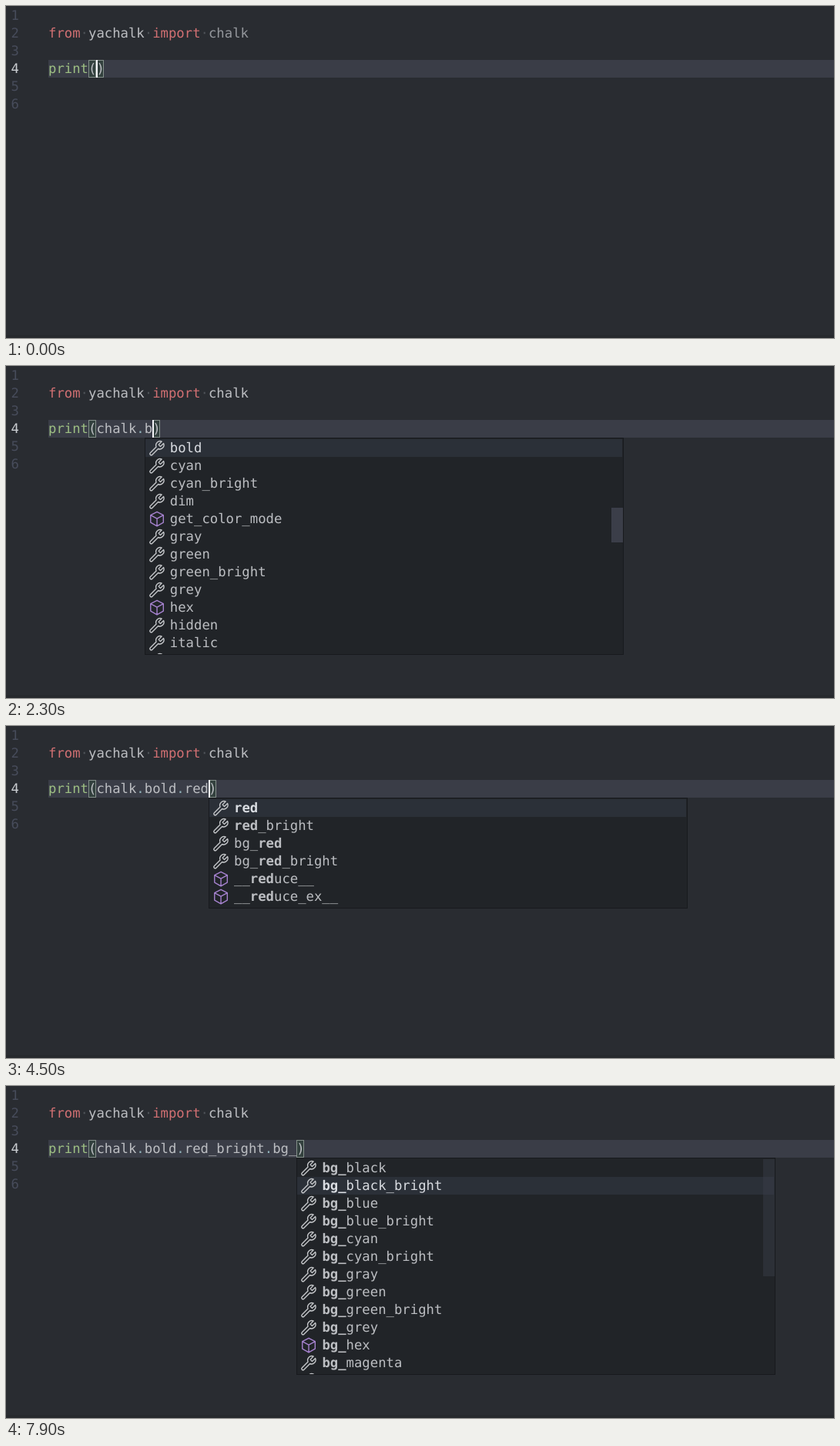
Animation of 1075x431 px, one loop 8 s. Source, as an HTML page:

```html
<!DOCTYPE html>
<html lang="en">
<head>
<meta charset="utf-8">
<title>Editor completion</title>
<style>
  html, body { margin: 0; width: 100%; height: 100%; overflow: hidden; background: #292c31; }
  svg { display: block; }
  text {
    font: 17.28px "DejaVu Sans Mono", monospace;
    text-rendering: geometricPrecision;
    white-space: pre;
    fill: #bcbec2;
  }
  .num { fill: #474c5b; }
  .on { fill: #c9ccd0; }
  .key { fill: #d27073; }
  .fn { fill: #9dbf83; }
  .ws { fill: #4d5157; }
  .unused { fill: #94979c; }
  .dot { fill: #8fb0b8; }
  .hit { font-weight: bold; }
  .picked { fill: #d9dce1; }
  .match { fill: #00640020; stroke: #84908a; }
  .wrench { fill: none; stroke: #c5c7ca; }
  .cube { fill: none; stroke: #a783d0; }
</style>
</head>
<body>
<svg id="stage" xmlns="http://www.w3.org/2000/svg" width="1075" height="431" viewBox="0 0 1075 431">
  <defs>
    <path id="wrench" class="wrench" stroke-linejoin="round" d="M12.4 1.8A3.9 3.9 0 0 0 7.3 6.9L1.7 12.5a1.25 1.25 0 0 0 1.8 1.8L9.1 8.7A3.9 3.9 0 0 0 14.2 3.6L11.2 6.5 9.5 4.8Z"/>
    <path id="cube" class="cube" stroke-linejoin="round" d="M8 1.3L14 4.5V11.3L8 14.7 2 11.3V4.5ZM2 4.5L8 7.7 14 4.5M8 7.7V14.7"/>
  </defs>
  <rect width="1075" height="431" fill="#292c31"/>
  <rect y="427" width="1075" height="4" fill="#26292d"/>
  <rect x="55" y="70" width="1020" height="23" fill="#3a3d47"/>
  <g id="gutter"></g>
  <text x="55" y="41"><tspan class="key">from</tspan><tspan class="ws">·</tspan>yachalk<tspan class="ws">·</tspan><tspan class="key">import</tspan><tspan class="ws">·</tspan><tspan id="imported">chalk</tspan></text>
  <g id="code"></g>
</svg>
<script>
const LOOP = 8000, LEFT = 55, CHAR = 10.4, ROW = 23, LINE = 70, TOP = 95;
const $ = id => document.getElementById(id);
const colX = col => LEFT + col * CHAR;

// A leading * marks a method; top is the first row's offset, thumb is [y, height].
const lists = {
  c: { hit: 'c', items: '*chalk *callable *chr class classmethod *compile complex continue copyright credits *chunk count *cycle' },
  ch: { hit: 'ch', items: '*chalk *chr ChildProcessError ChainMap *chain *check_call *check_output *chdir *chmod *chown *choice *choices *chroot' },
  all: { hit: '', thumb: [184, 45], items: 'bold cyan cyan_bright dim *get_color_mode gray green green_bright grey *hex hidden italic magenta' },
  tail: { hit: '', thumb: [243, 45], items: 'red_bright reset *rgb strikethrough underline visible white white_bright yellow yellow_bright __annotations__ *__class__ *__delattr__' },
  b: { hit: 'b', sel: 6, top: -20, thumb: [266, 108], items: 'bg_yellow bg_yellow_bright black black_bright blue blue_bright bold red_bright cyan_bright green_bright white_bright yellow_bright magenta_bright' },
  bol: { hit: 'bol', items: 'bold bg_yellow bg_yellow_bright' },
  re: { hit: 're', items: 'red red_bright reset bg_red bg_red_bright *__reduce__ *__reduce_ex__ *__repr__' },
  red: { hit: 'red', items: 'red red_bright bg_red bg_red_bright *__reduce__ *__reduce_ex__' },
  bg: { hit: 'bg', thumb: [95, 152], items: 'bg_black bg_black_bright bg_blue bg_blue_bright bg_cyan bg_cyan_bright bg_gray bg_green bg_green_bright bg_grey *bg_hex bg_magenta bg_magenta_bright' }
};
lists.bg_ = { ...lists.bg, hit: 'bg_' };

const RB = 'chalk.bold.red_bright';
// time, typed text, caret shown, popup [list, column, picked row, thumb opacity]
const steps = [
  [0, '', 1],
  [400, 'c', 1],
  [500, 'ch', 1, ['c', 7]],
  [800, 'ch', 1, ['ch', 8]],
  [1100, 'chalk', 1],
  [1600, 'chalk', 0],
  [1900, 'chalk.', 1],
  [2000, 'chalk.', 1, ['all', 12, 0, 0.45]],
  [2300, 'chalk.b', 1, ['all', 12]],
  [2500, 'chalk.bo', 1, ['b', 13]],
  [2600, 'chalk.bol', 1, ['bol', 15]],
  [3100, 'chalk.bold', 1],
  [3600, 'chalk.bold', 0],
  [3800, 'chalk.bold.', 1],
  [3900, 'chalk.bold.', 1, ['all', 17, 0, 0.45]],
  [4000, 'chalk.bold.', 1, ['all', 17]],
  [4200, 'chalk.bold.r', 1, ['all', 17]],
  [4300, 'chalk.bold.re', 1, ['re', 19]],
  [4500, 'chalk.bold.red', 1, ['red', 20]],
  [5000, 'chalk.bold.red', 0, ['red', 20]],
  [5100, 'chalk.bold.red', 0, ['red', 20, 1]],
  [5300, RB, 1],
  [5800, RB, 0],
  [6200, RB + '.', 1, ['tail', 28]],
  [6600, RB + '.b', 1, ['tail', 28]],
  [6800, RB + '.bg', 1, ['b', 29]],
  [7000, RB + '.bg', 1, ['bg', 30, 0, 0.45]],
  [7200, RB + '.bg_', 1, ['bg_', 31, 0, 0.45]],
  [7600, RB + '.bg_', 0, ['bg_', 31, 0, 0.45]],
  [7900, RB + '.bg_', 0, ['bg_', 31, 1, 0.45]]
];

const rect = (x, y, w, h, fill, more = '') =>
  `<rect x="${x}" y="${y}" width="${w}" height="${h}" fill="${fill}" ${more}/>`;

const bracketBox = col => {
  const x = Math.round(colX(col));
  return `<rect class="match" x="${x + 0.5}" y="${LINE + 0.5}" width="9" height="22"/>`;
};

function label(name, hit) {
  const at = hit ? name.toLowerCase().indexOf(hit) : -1;
  if (at < 0) return name;
  const end = at + hit.length;
  return `${name.slice(0, at)}<tspan class="hit">${name.slice(at, end)}</tspan>${name.slice(end)}`;
}

function popup([key, col, pick, opacity = 1]) {
  const { hit, items, sel = 0, top = 0, thumb } = lists[key];
  const names = items.split(' ');
  const height = Math.min(names.length, 12) * ROW + 3;
  const left = colX(col), x = Math.round(left - 0.15);
  const picked = pick ?? sel;
  const rows = names.map((item, i) => {
    const y = top + i * ROW, method = item[0] === '*';
    return (i === picked ? rect(1, y, 619, ROW, '#2b3038') : '') +
      `<use href="#${method ? 'cube' : 'wrench'}" transform="translate(5 ${y + 0.5}) scale(1.38)"/>` +
      `<text class="${i === picked ? 'picked' : ''}" x="${left - x + 33}" y="${y + 17}">${label(item.replace('*', ''), hit)}</text>`;
  }).join('');
  const bar = thumb ? rect(606, thumb[0] - TOP, 15, thumb[1], '#3b3e49', `opacity="${opacity}"`) : '';
  return rect(x + 0.5, 93.5, 621, height + 2, '#212428', 'stroke="#181a1e"') +
    `<svg x="${x}" y="${TOP}" width="621" height="${height}">${rows}${bar}</svg>`;
}

const bulb = '<path fill="#fc3" d="M64 67V61.5A6.7 6.7 0 1 1 70.5 61.5V67Z"/>' +
  rect(65.5, 62.5, 3.4, 3, '#292c31');

function squiggle() {
  let d = 'M117 92';
  for (let i = 1; i <= 7; i++) d += `L${117 + i * 3} ${i % 2 ? 89.8 : 92.3}`;
  return `<path d="${d}" fill="none" stroke="#cfa52c" stroke-width="1.2"/>`;
}

function draw(i, warned, lit) {
  const [, typed, caret, list] = steps[i];
  const end = 6 + typed.length;
  const body = typed.replace(/\./g, '<tspan class="dot">.</tspan>');
  $('imported').setAttribute('class', steps[i][0] < 1900 ? 'unused' : '');
  $('code').innerHTML =
    bracketBox(5) + bracketBox(end) +
    `<text x="${LEFT}" y="${LINE + 17}"><tspan class="fn">print</tspan>(${body})</text>` +
    (warned ? squiggle() : '') + (lit ? bulb : '') +
    (caret ? rect(Math.round(colX(end)), LINE, 2, ROW, '#f4f5f7') : '') +
    (list ? popup(list) : '');
}

$('gutter').innerHTML = [1, 2, 3, 4, 5, 6].map(n =>
  `<text class="${n === 4 ? 'on' : 'num'}" x="6.6" y="${n * ROW - 5}">${n}</text>`).join('');

const start = performance.now();
let shown = '';
function tick() {
  const t = Math.max(0, performance.now() - start) % LOOP;
  const i = steps.findLastIndex(s => s[0] <= t);
  const warned = t >= 800 && t < 1900, lit = t >= 800 && t < 1400;
  const state = `${i} ${lit}`;
  if (state !== shown) {
    shown = state;
    draw(i, warned, lit);
  }
  requestAnimationFrame(tick);
}
tick();
</script>
</body>
</html>
```
